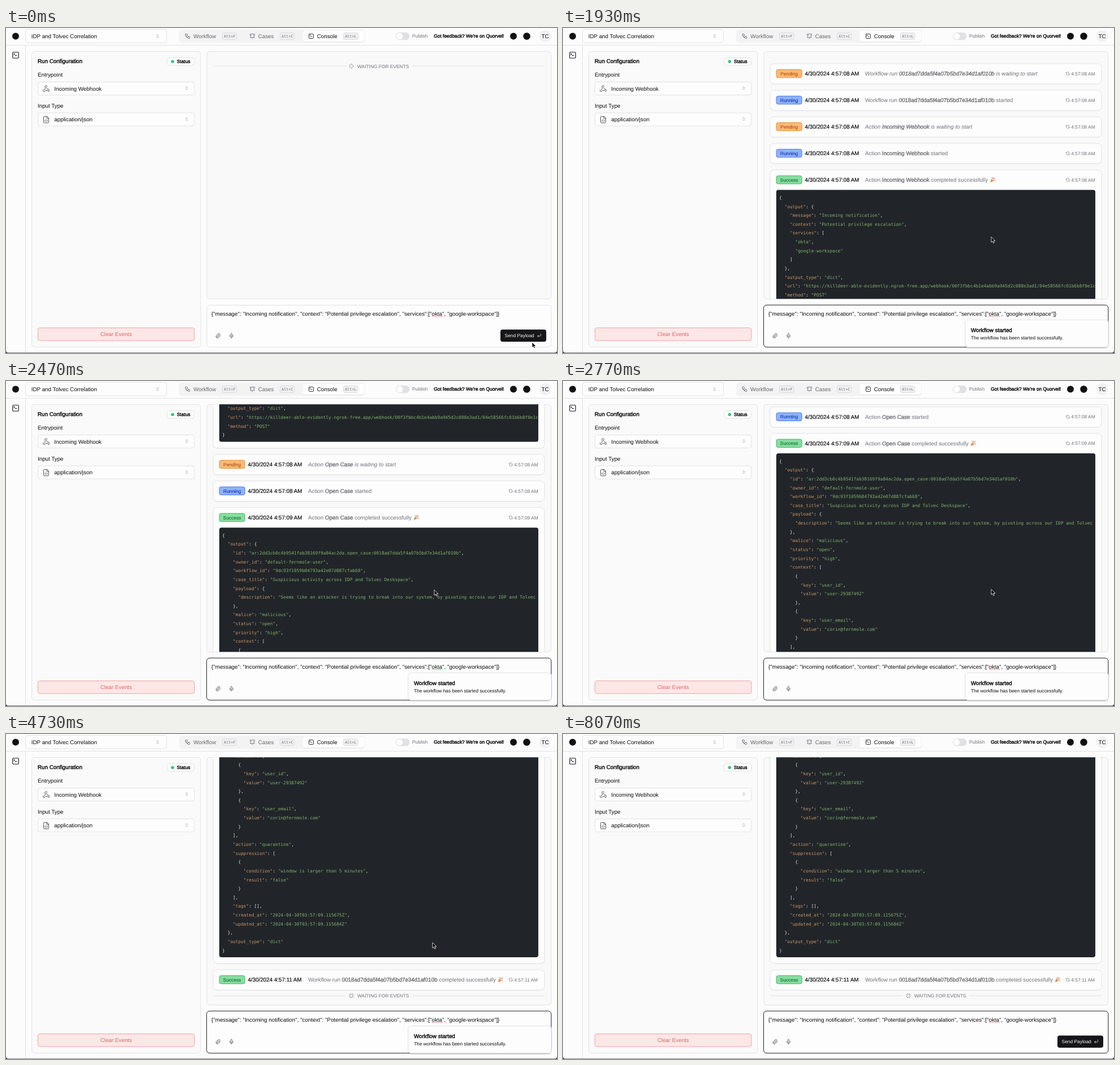
An HTML page that plays this animation: 974 by 575 pixels, repeating every 8100 ms.

```html
<!DOCTYPE html>
<html lang="en">
<head>
<meta charset="utf-8">
<title>Workflow console</title>
<style>
html, body { margin: 0; width: 974px; height: 575px; overflow: hidden; background: #fcfcfc; }
svg { display: block; }
text { font: 9.8px "Liberation Sans", Arial, sans-serif; fill: #0c0c0f; white-space: pre; text-rendering: geometricPrecision; }
.xs { font-size: 8.4px; }
.b { stroke: currentColor; stroke-width: .4px; }
.muted { fill: #71717a; color: #71717a; }
.it { font-style: italic; }
.kbd { font: 6.7px "DejaVu Sans Mono", monospace; fill: #71717a; }
.code { font: 7.815px "DejaVu Sans Mono", monospace; fill: #e0e2e4; }
.key { fill: #cc9468; }
.str { fill: #80b26e; }
.icon { fill: none; stroke-linecap: round; stroke-linejoin: round; }
</style>
</head>
<body>
<svg id="stage" width="974" height="575" viewBox="0 0 974 575"></svg>
<script>
const LOOP = 8100, LINE = 15.64, EDGE = '#e2e2e6';
const RUN = '0018ad7dda5f4a07b5bd7e34d1af010b';

const text = (x, y, s, cls = '', attrs = '') => `<text x="${x}" y="${y}" class="${cls}" ${attrs}>${s}</text>`;
const box = (x, y, w, h, r, fill, stroke = 'none', attrs = '') =>
  `<rect x="${x}" y="${y}" width="${w}" height="${h}" rx="${r}" fill="${fill}" stroke="${stroke}" ${attrs}/>`;
const dot = (x, y, r, fill) => `<circle cx="${x}" cy="${y}" r="${r}" fill="${fill}"/>`;
const line = (x1, y1, x2, y2, color = EDGE) => `<path d="M${x1} ${y1}L${x2} ${y2}" stroke="${color}"/>`;

// Icons are drawn on a 24-unit grid and centred on (x, y).
const ICONS = {
  flow: 'M5 3h4a2 2 0 0 1 2 2v4a2 2 0 0 1-2 2H5a2 2 0 0 1-2-2V5a2 2 0 0 1 2-2zM7 11v4a2 2 0 0 0 2 2h4M15 13h4a2 2 0 0 1 2 2v4a2 2 0 0 1-2 2h-4a2 2 0 0 1-2-2v-4a2 2 0 0 1 2-2z',
  bell: 'M6 8a6 6 0 0 1 12 0c0 7 3 9 3 9H3s3-2 3-9M10.3 21a2 2 0 0 0 3.4 0M4 2C2.8 3.7 2 5.7 2 8M22 8c0-2.3-.8-4.3-2-6',
  term: 'M5 3h14a2 2 0 0 1 2 2v14a2 2 0 0 1-2 2H5a2 2 0 0 1-2-2V5a2 2 0 0 1 2-2zM7 11l2-2-2-2M11 13h4',
  updown: 'M7 15l5 5 5-5M7 9l5-5 5 5',
  hook: 'M18 17h-6c-1.1 0-2 .9-2.5 1.9A4 4 0 0 1 2 17c0-.7.2-1.4.6-2M6 17l3.1-5.8c.5-1 .1-2.2-.5-3.1a4 4 0 1 1 6.9-4M12 6l3.1 5.7C15.7 12.7 16.9 13 18 13a4 4 0 0 1 0 8',
  json: 'M14.5 2H6a2 2 0 0 0-2 2v16a2 2 0 0 0 2 2h12a2 2 0 0 0 2-2V7.5zM14 2v6h6M10 12a1 1 0 0 0-1 1v1a1 1 0 0 1-1 1 1 1 0 0 1 1 1v1a1 1 0 0 0 1 1M14 18a1 1 0 0 0 1-1v-1a1 1 0 0 1 1-1 1 1 0 0 1-1-1v-1a1 1 0 0 0-1-1',
  clip: 'M21.4 11l-9.2 9.2a6 6 0 0 1-8.4-8.4l8.5-8.6A4 4 0 1 1 18 8.8l-8.6 8.6a2 2 0 0 1-2.8-2.8l8.5-8.5',
  mic: 'M12 2a3 3 0 0 0-3 3v7a3 3 0 0 0 6 0V5a3 3 0 0 0-3-3zM19 10v2a7 7 0 0 1-14 0v-2M12 19v3',
  enter: 'M9 10l-5 5 5 5M20 4v7a4 4 0 0 1-4 4H4',
  sync: 'M2 9l3-4 4 3M5 6v8a7 7 0 0 0 7 7h2M22 15l-3 4-4-3M19 18v-8a7 7 0 0 0-7-7h-2',
  load: 'M12 2v4M12 18v4M5 5l3 3M16 16l3 3M2 12h4M18 12h4M5 19l3-3M16 8l3-3'
};
const icon = (name, x, y, size, color = '#3f3f46', weight = 2) =>
  `<path class="icon" d="${ICONS[name]}" stroke="${color}" stroke-width="${weight}" transform="translate(${x} ${y}) scale(${size / 24}) translate(-12 -12)"/>`;

const popper = (x, y) => `<g transform="translate(${x} ${y})">
  <path d="M0 4.5L2.5-2.3L6.3 2z" fill="#e9a94b"/><path d="M1 2L3.5 3.2M2 0L5 2.4" stroke="#b9683c" stroke-width=".8"/>
  <path d="M4-1.5Q5-3 4.3-4.5M5-.5Q6.5-2.5 9-3M6 .8Q8-.2 9 1.2" fill="none" stroke="#c9604f"/>
  ${dot(6.6, -4, .7, '#d8a13c')}${dot(2, -4, .6, '#6f9bd8')}${dot(8.8, 3, .6, '#7db06a')}</g>`;

const BADGES = {
  Pending: ['#fdba74', '#e08a3c', '#b4571c'],
  Running: ['#8fb2fb', '#4a7be8', '#1d3fae'],
  Success: ['#86dfa0', '#44b468', '#1f7440']
};

const webhookOut = `{
  "output": {
    "message": "Incoming notification",
    "context": "Potential privilege escalation",
    "services": [
      "okta",
      "google-workspace"
    ]
  },
  "output_type": "dict",
  "url": "https://killdeer-able-evidently.ngrok-free.app/webhook/00f3fbbc4b1e4abb9a945d2c088e3ad1/04e58566fc01b6b8f0e1c8",
  "method": "POST"
}`;
const caseOut = `{
  "output": {
    "id": "ar:2dd3cb0c4b9541fab38169f9a84ac2da.open_case:${RUN}",
    "owner_id": "default-fernmole-user",
    "workflow_id": "9dc93f1059b84793a42e07d887cfab68",
    "case_title": "Suspicious activity across IDP and Tolvec Deskspace",
    "payload": {
      "description": "Seems like an attacker is trying to break into our system, by pivoting across our IDP and Tolvec Deskspace"
    },
    "malice": "malicious",
    "status": "open",
    "priority": "high",
    "context": [
      {
        "key": "user_id",
        "value": "user-29387492"
      },
      {
        "key": "user_email",
        "value": "corin@fernmole.com"
      }
    ],
    "action": "quarantine",
    "suppression": [
      {
        "condition": "window is larger than 5 minutes",
        "result": "false"
      }
    ],
    "tags": [],
    "created_at": "2024-04-30T03:57:09.115675Z",
    "updated_at": "2024-04-30T03:57:09.115684Z"
  },
  "output_type": "dict"
}`;

// at: arrival time in ms; popX: where the party popper follows the sentence.
const events = [
  { at: 900, kind: 'Pending', sec: '08', msg: `Workflow run *${RUN}* is waiting to start` },
  { at: 940, kind: 'Running', sec: '08', msg: `Workflow run *${RUN}* started` },
  { at: 1000, kind: 'Pending', sec: '08', msg: 'Action *Incoming Webhook* is waiting to start' },
  { at: 1040, kind: 'Running', sec: '08', msg: 'Action *Incoming Webhook* started' },
  { at: 1140, kind: 'Success', sec: '08', msg: 'Action *Incoming Webhook* completed successfully', popX: 755, code: webhookOut },
  { at: 1200, kind: 'Pending', sec: '08', msg: 'Action *Open Case* is waiting to start' },
  { at: 1240, kind: 'Running', sec: '08', msg: 'Action *Open Case* started' },
  { at: 1500, kind: 'Success', sec: '09', msg: 'Action *Open Case* completed successfully', popX: 720.5, code: caseOut },
  { at: 4300, kind: 'Success', sec: '11', msg: `Workflow run *${RUN}* completed successfully`, popX: 869.5 }
];

function codeBlock(src, y) {
  const rows = src.split('\n'), h = rows.length * LINE + 10.2;
  const paint = s => s.replace(/"[^"]*"(:?)/g, (m, colon) =>
    colon ? `<tspan class="key">${m.slice(0, -1)}</tspan>:` : `<tspan class="str">${m}</tspan>`);
  const body = rows.map((s, i) => text(5.3, 16.6 + i * LINE, paint(s), 'code')).join('');
  return { h, svg: `<svg x="377" y="${y}" width="564" height="${h}">${box(0, 0, 564, h, 4, '#212529')}${body}</svg>` };
}

let next = 63;
function card(e, i) {
  const top = next, mid = top + 17.7, code = e.code && codeBlock(e.code, top + 35.3);
  const h = code ? code.h + 46.5 : 36;
  const [fill, edge, ink] = BADGES[e.kind];
  const time = `4:57:${e.sec} AM`;
  const msg = e.msg.replace(/\*(.*?)\*/, '<tspan class="b">$1</tspan>');
  next = e.end = top + h + 11;
  return `<g id="card${i}">${box(366, top + .8, 586, h, 7, '#00000010')}
    ${box(366, top, 586, h, 7, '#fdfdfd', EDGE)}
    ${box(377.2, mid - 7.3, 45, 14.4, 3, fill, edge)}
    ${text(399.7, mid + 3, e.kind, 'xs', `text-anchor="middle" stroke="${ink}" stroke-width=".2" style="fill:${ink}"`)}
    ${text(427.6, mid + 3.5, `4/30/2024 ${time}`, '', 'stroke="#0c0c0f" stroke-width=".2"')}
    ${text(534, mid + 3.5, msg, 'muted' + (e.kind === 'Pending' ? ' it' : ''))}
    ${e.popX ? popper(e.popX, mid) : ''}
    ${icon('sync', 892.3, mid, 8, '#71717a')}${text(898.3, mid + 3, time, 'xs muted')}
    ${code ? code.svg : ''}</g>`;
}

const select = (y, name, label) => box(56.5, y, 276.5, 23, 4, '#fdfdfd', EDGE) + icon(name, 71, y + 12, 13.5, '#3f3f46', 1.6) +
  text(85.3, y + 15.2, label) + icon('updown', 319.5, y + 11, 8, '#71717a');
const tab = (x, name, label, keyX, key, color) => icon(name, x, 14.5, 10.5, color) + text(x + 10.2, 18, label, '', `style="fill:${color}"`) +
  box(keyX, 8.5, 25.5, 12, 2.5, '#f0f0f1', '#dcdce0') + text(keyX + 2.8, 17, key, 'kbd');

const header = `
  ${line(0, 30.5, 974, 30.5)}${line(34.5, 30, 34.5, 575)}
  ${dot(17, 14.5, 6, '#111')}
  ${box(34.5, 2.5, 249.5, 23.5, 4, '#fdfdfd', EDGE)}${text(44.8, 17.8, 'IDP and Tolvec Correlation')}${icon('updown', 268, 14.5, 8, '#71717a')}
  ${box(306, 3, 328, 23.5, 5, '#f3f3f4')}${box(524.5, 5.8, 108.5, 19, 4, '#00000014')}${box(524.5, 5, 108.5, 19, 4, '#fefefe')}
  ${tab(321, 'flow', 'Workflow', 382.5, 'Alt+F', '#65656e')}
  ${tab(435.5, 'bell', 'Cases', 484.5, 'Alt+C', '#65656e')}
  ${tab(539.5, 'term', 'Console', 596.5, 'Alt+L', '#0c0c0f')}
  ${box(689, 8, 24.5, 13.2, 6.6, '#e1e1e4')}${dot(695.8, 14.6, 5.6, '#fff')}
  ${text(718, 17.3, 'Publish', 'xs muted')}
  ${text(756.3, 17.4, "Got feedback? We're on Quorvel!", 'xs b')}
  ${dot(897, 14.5, 6, '#111')}${dot(920.5, 14.5, 6.3, '#111')}
  ${dot(953, 14.5, 10.5, '#f1f1f2')}${text(953, 18, 'TC', '', 'text-anchor="middle"')}
  ${icon('term', 17, 48, 14, '#18181b')}`;

const sidebar = `
  ${box(45.5, 41.5, 298.5, 523, 5, '#fafafa', EDGE)}
  ${text(56, 62, 'Run Configuration', 'b')}
  ${box(285, 52.5, 48, 13.5, 4, '#fdfdfd', EDGE)}${dot(294.5, 59.3, 2.8, '#35c97c')}${text(302, 62.2, 'Status', 'xs b')}
  ${text(56, 86, 'Entrypoint')}${select(95.5, 'hook', 'Incoming Webhook')}
  ${text(56, 140.7, 'Input Type')}${select(150.2, 'json', 'application/json')}
  ${box(56.5, 530.5, 276.5, 22.5, 3.5, '#fce7e7', '#f0a3a3')}
  ${text(194.7, 545.3, 'Clear Events', '', 'text-anchor="middle" style="fill:#df6666"')}`;

const composer = `
  ${box(355, 490.5, 608.5, 74, 5, '#fdfdfd', EDGE)}
  ${box(354.6, 490.1, 609.2, 74.6, 5.4, 'none', '#27272a', 'id="ring"')}
  ${text(363, 508.7, '{"message": "Incoming notification", "context": "Potential privilege escalation", "services":["okta", "google-workspace"]}')}
  <path d="M753 510.5H772" stroke="#e05050" stroke-dasharray="1.3 1.2"/>
  ${icon('clip', 375, 544.5, 10, '#52525b')}${icon('mic', 398.5, 544.5, 10, '#52525b')}
  ${box(874, 533.5, 81, 21.5, 4, '#161618')}${text(881.6, 547.3, 'Send Payload', 'xs', 'style="fill:#fafafa"')}${icon('enter', 942.5, 544, 8.5, '#fafafa')}`;

const stage = document.getElementById('stage');
stage.innerHTML = `
  <clipPath id="view"><rect x="355.5" y="41.3" width="608" height="438" rx="5"/></clipPath>
  ${box(0, 0, 974, 575, 0, '#fcfcfc')}${header}${sidebar}
  ${box(355, 41.5, 608.5, 438, 5, '#f9f9f9', EDGE)}
  <g clip-path="url(#view)"><g id="list">${events.map(card).join('')}
    <g id="waiting">${line(366, 0, 601, 0)}${line(718, 0, 952, 0)}
      <g id="spinner">${icon('load', 0, 0, 10, '#71717a')}</g>${text(621, 3, 'WAITING FOR EVENTS', 'xs muted')}</g></g></g>
  ${composer}
  <g id="toast">${box(711, 518, 253, 49, 5, '#00000012')}${box(710, 517.5, 255, 50, 6, '#0000000a')}
    ${box(711, 516.5, 253, 48, 4.5, '#fdfdfd', EDGE)}
    ${text(721, 537.5, 'Workflow started', 'b')}${text(721, 551, 'The workflow has been started successfully.', 'xs')}</g>
  ${line(0, 574.6, 974, 574.6, '#77777a')}
  <path d="M0 570Q0 575 5 575H0zM974 570Q974 575 969 575H974z" fill="#222"/>
  <path id="cursor" d="M0 0V9.6L2.2 7.6L3.7 11L5.4 10.3L3.9 7H6.9z" fill="#000" stroke="#fff" stroke-width=".8"/>`;

const el = id => document.getElementById(id);
const clamp = v => Math.min(1, Math.max(0, v));
const ease = v => v * v * (3 - 2 * v);
// Interpolates rows of [time, ...values].
function track(keys, t, curve = v => v) {
  const i = keys.findIndex(k => k[0] > t);
  if (i < 0) return keys[keys.length - 1].slice(1);
  if (!i) return keys[0].slice(1);
  const a = keys[i - 1], b = keys[i], p = curve((t - a[0]) / (b[0] - a[0]));
  return a.slice(1).map((v, n) => v + (b[n + 1] - v) * p);
}
const scrollKeys = [[1990, 0], [2300, 243.6], [2480, 400], [2770, 523], [3320, 700], [4320, 738], [4600, 814]];
const cursorKeys = [[0, 930, 556], [250, 919, 545], [850, 919, 545], [1500, 757, 369.5], [2500, 757, 369.5], [2750, 757, 368.5],
  [4200, 757, 368.5], [4600, 754, 369], [5800, 754, 369], [6450, 829, 348], [6700, 829, 348], [7300, 862, 2]];
const CLICK = 330, TOAST_IN = 480, TOAST_OUT = 5500;
const place = (id, x, y) => el(id).setAttribute('transform', `translate(${x} ${y})`);
const show = (id, on) => { el(id).style.display = on ? '' : 'none'; };

function draw(t) {
  let end = 68.5;
  events.forEach((e, i) => {
    show('card' + i, t >= e.at);
    if (t >= e.at) end = e.end;
  });
  place('waiting', 0, end - 1);
  el('spinner').setAttribute('transform', `translate(610.5 0) rotate(${t * .12})`);
  place('list', 0, -track(scrollKeys, t)[0]);
  show('ring', t >= CLICK);

  const rise = ease(clamp((t - TOAST_IN) / 180)), leave = ease(clamp((t - TOAST_OUT) / 180));
  place('toast', leave * 264, (1 - rise) * 60);
  show('toast', rise > 0 && leave < 1);
  el('toast').style.opacity = 1 - leave * .2;

  place('cursor', ...track(cursorKeys, t, ease));
  show('cursor', t < 7300);
}

const start = performance.now();
function tick() {
  draw((performance.now() - start) % LOOP);
  requestAnimationFrame(tick);
}
tick();
</script>
</body>
</html>
```
